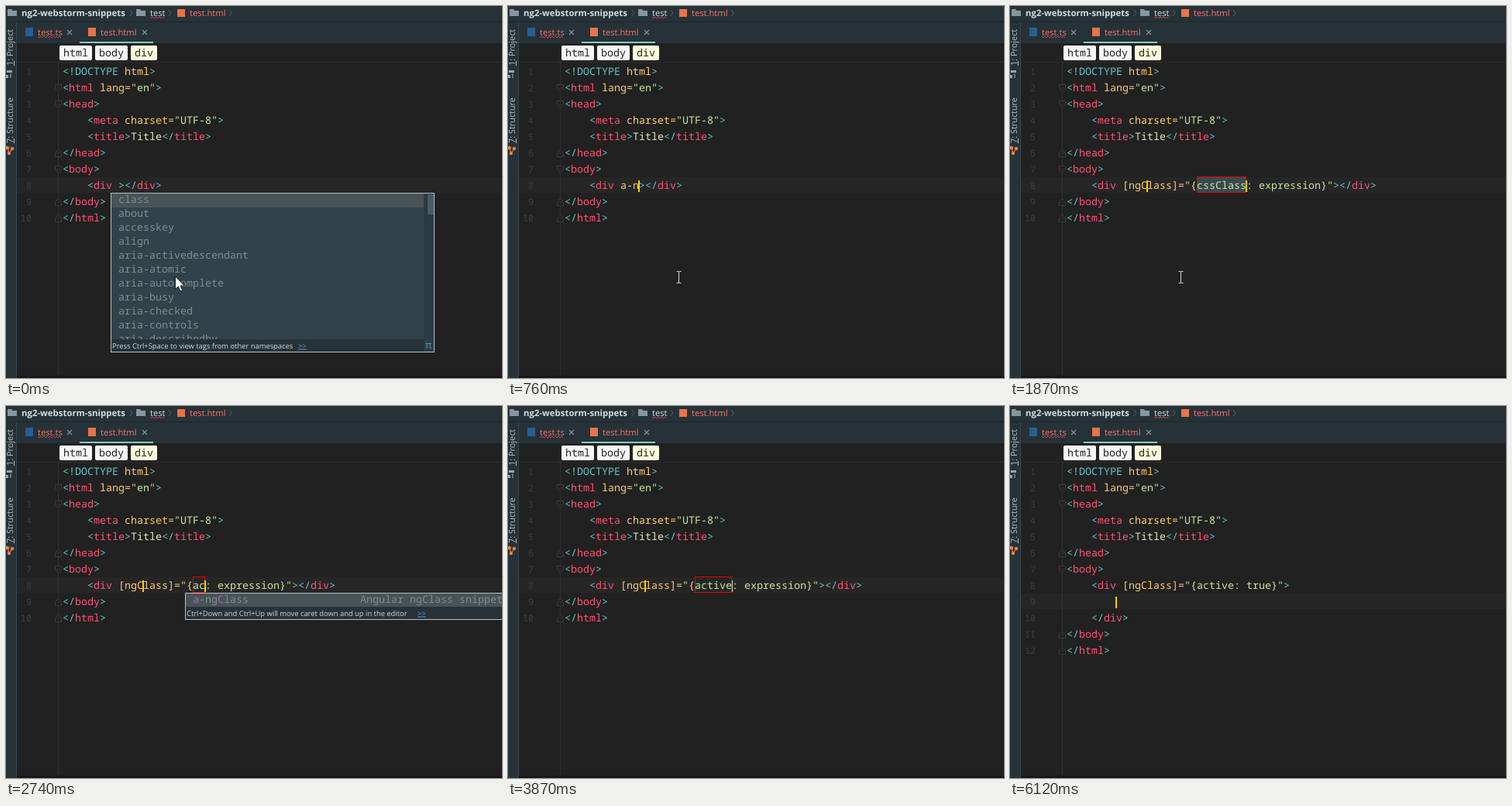
An HTML page for the animation above (7 s loop, 640 by 480 pixels).

```html
<!DOCTYPE html>
<html lang="en">
<head>
<meta charset="utf-8">
<title>Editor snippet</title>
<style>
  html, body { margin: 0; width: 100%; height: 100%; overflow: hidden; background: #212121; }
  svg { display: block; width: 640px; height: 480px; }
  text { white-space: pre; text-rendering: geometricPrecision; }
  .code { font: 500 13.333px "Noto Sans Mono", "DejaVu Sans Mono", monospace; }
  .num { font: 11.7px "Noto Sans Mono", "DejaVu Sans Mono", monospace; fill: #3c3f40; }
  .ui { font-family: "Open Sans", "Noto Sans", sans-serif; font-size: 11.2px; }
  .tip { font-family: "Open Sans", "Noto Sans", sans-serif; font-size: 9.4px; }
</style>
</head>
<body>
<svg id="stage" viewBox="0 0 640 480" xmlns="http://www.w3.org/2000/svg">
  <g id="frame"></g>
  <g id="editor"></g>
</svg>
<script>
const LOOP = 7000, CELL = 8, LEFT = 73, ROW = 21;
const C = {
  bracket: '#66c5c9', tag: '#ff5370', attr: '#ffcb6b', string: '#c9e69a', plain: '#e4e6b4',
  panel: '#263238', caret: '#ffcc00', red: '#f00000', dim: '#7f8c90', hit: '#ab63bd', salmon: '#f77669'
};

const esc = s => s.replace(/&/g, '&amp;').replace(/</g, '&lt;').replace(/>/g, '&gt;');
const rect = (x, y, w, h, fill, more = '') =>
  `<rect x="${x}" y="${y}" width="${w}" height="${h}" fill="${fill}" ${more}/>`;
const text = (x, y, s, fill, cls = 'code', more = '') =>
  `<text x="${x}" y="${y}" class="${cls}" fill="${fill}" xml:space="preserve" ${more}>${esc(s)}</text>`;
const path = (d, stroke, more = '') => `<path d="${d}" fill="none" stroke="${stroke}" ${more}/>`;
const colX = col => LEFT + col * CELL;
const rowY = row => 74 + (row - 1) * ROW;

function wave(x, end, y) {
  let d = `M${x} ${y}`;
  for (let i = 1; x + i * 2 <= end; i++) d += `L${x + i * 2} ${y + (i % 2 ? 2 : 0)}`;
  return path(d, '#d8404a', 'stroke-width="0.9"');
}

// Colours one line of markup
function markup(line, row) {
  let col = 0, mode = 'plain', out = '';
  for (const [part] of line.matchAll(/<!DOCTYPE|<\/?|>|"[^"]*"|\s+|[^<>"\s]+/g)) {
    let fill = C[mode];
    if (part === '<!DOCTYPE') { fill = C.bracket; mode = 'attr'; }
    else if (part[0] === '<') { fill = C.bracket; mode = 'tag'; }
    else if (part === '>') { fill = C.bracket; mode = 'plain'; }
    else if (part[0] === '"') fill = C.string;
    else if (mode === 'tag' && part.trim()) mode = 'attr';
    if (part.trim()) out += text(colX(col), rowY(row) + 15, part, fill);
    col += part.length;
  }
  return out;
}

const folder = x => `<path d="M${x} 4h5l1.5 2h5.5v7h-12z" fill="#8497a0"/>`;
const chevron = x => path(`M${x} 5l3 4l-3 4`, '#52636b');
const cross = x => path(`M${x - 3} 31l6 6m0 -6l-6 6`, '#82929a', 'stroke-width="1.2"');
const sideLabel = (y, s) =>
  text(0, 0, s, '#b4c1c7', 'ui', `style="font-size:10.9px" transform="translate(9 ${y}) rotate(-90)"`);
const crumb = (x, w, s, fill) =>
  rect(x, 51, w, 19, fill, 'rx="2"') + text(x + 5, 65, s, '#222');

function chrome() {
  return rect(0, 0, 640, 480, '#212121') +
    rect(0, 0, 640, 48, C.panel) + rect(0, 20, 640, 1, '#1c262b') +
    rect(0, 21, 13, 459, C.panel) + rect(13, 21, 1, 459, '#3a484f') +
    folder(2) + text(20, 13, 'ng2-webstorm-snippets', '#d3dce0', 'ui', 'style="font-size:11.4px;font-weight:700"') +
    chevron(160) + folder(168) + text(186, 13, 'test', '#d3dce0', 'ui') + wave(186, 205, 14) +
    chevron(210) + rect(221, 4, 10, 10, '#e8734a') + text(237, 13, 'test.html', C.salmon, 'ui') + chevron(288) +
    rect(25, 28, 10, 11, '#285f91') + text(41, 38, 'test.ts', C.salmon, 'ui') + wave(41, 72, 39) + cross(82) +
    rect(106, 28, 10, 11, '#e8734a') + text(122, 38, 'test.html', C.salmon, 'ui') + cross(179) +
    rect(95, 46, 95, 2, '#80cbc4') +
    sideLabel(77, '1: Project') + rect(10, 71, 1, 6, '#b4c1c7') +
    rect(1, 83, 7, 3, '#9aa7ad') + rect(0, 89, 3, 4, '#9aa7ad') + rect(5, 87, 2, 6, '#65747b') +
    sideLabel(177, '7: Structure') + rect(10, 171, 1, 6, '#b4c1c7') +
    path('M2 183L4 190L8 184', '#c9793f', 'stroke-width="1.3"') +
    [[2, 183], [8, 184], [4, 190]].map(([x, y]) => `<circle cx="${x}" cy="${y}" r="2.2" fill="#e8824c"/>`).join('') +
    rect(14, 72, 626, 1, '#2e2e2e') +
    crumb(69, 42, 'html', '#f6f6f6') + crumb(115, 42, 'body', '#f6f6f6') + crumb(161, 34, 'div', '#fafbdc') +
    rect(14, 477, 626, 3, '#191719');
}

function fold(row, closing) {
  const y = rowY(row) + 11;
  const d = closing ? `M63.5 ${y + 4.5}v-5l4 -4l4 4v5z` : `M63.5 ${y - 4.5}v5l4 4l4 -4v-5z`;
  return `<path d="${d}" fill="#212121" stroke="#3b3b3b"/>` + rect(65.5, y - .5, 4, 1, '#3b3b3b');
}

// Colours the letters of a suggestion that match the typed query
function suggestion(x, y, word, query) {
  let k = 0, spans = '';
  for (const ch of word) {
    const hit = k < query.length && ch.toLowerCase() === query[k];
    if (hit) k++;
    spans += `<tspan fill="${hit ? C.hit : C.dim}">${ch}</tspan>`;
  }
  return `<text x="${x}" y="${y}" class="code">${spans}</text>`;
}

function popup({ x = 135, w = 418, items, notes = [], query, tip, link, bottom, right = 531, bar = true, thumb = 0, bulb }) {
  const top = 241, foot = bottom - 16, edge = bar ? x + 404 : x + w;
  let out = rect(x, top, w, bottom - top, '#31424a') + rect(x, top + 1, edge - x, 18, '#495257');
  out += `<clipPath id="list"><rect x="${x}" y="${top}" width="${w}" height="${foot - top}"/></clipPath><g clip-path="url(#list)">`;
  items.forEach((word, i) => {
    const y = 254 + i * 18;
    out += suggestion(x + 10, y, word, query);
    if (notes[i]) out += text(right, y, notes[i], C.dim, 'code', 'text-anchor="end"');
  });
  out += '</g>';
  if (bar) out += rect(edge, top + 1, 14, foot - top - 1, '#2a3a42');
  if (thumb) out += rect(544, 243, 8, thumb, '#4b5a62');
  out += rect(x, foot, w, 16, C.panel) + text(x + 2, bottom - 4.5, tip, '#d2dadd', 'tip') +
    text(link, bottom - 4.5, '>>', '#5b9fd0', 'tip', 'text-decoration="underline"');
  if (bar) out += rect(539, foot, 14, 16, '#2b3c45') + text(541, bottom - 4, 'π', '#4fa3d1', 'ui', 'style="font-size:13px"');
  if (bulb) out += '<circle cx="543" cy="250" r="4.8" fill="#f5b74b"/><circle cx="542" cy="249" r="2" fill="#ffdb8b"/>' +
    rect(541, 255, 4, 4, '#b9bdbf');
  return out + rect(x + .5, top + .5, w - 1, bottom - top, 'none', 'stroke="#b4c0c5"');
}

const arrow = '<path d="M218.5 349v16.5l3.8 -3.6l2.6 6l2.8 -1.2l-2.6 -5.8h5.2z" fill="#fff" stroke="#111" stroke-width="0.9"/>';
const beam = path('M217.5 342.5h2.5l.5 1l.5 -1h2.5M220.5 343v14M217.5 357.5h2.5l.5 -1l.5 1h2.5', '#d8d8d8');

const aria = 'activedescendant atomic autocomplete busy checked controls describedby disabled dropeffect expanded flowto'
  .split(' ').map(s => 'aria-' + s);
const attrList = (items, query) => popup({
  items: items.slice(0, 11), query, bottom: 446, thumb: 26, link: 377,
  tip: 'Press Ctrl+Space to view tags from other namespaces'
});
const directives = ['Class', 'For', 'If', 'Model', 'Style', 'Switch'];
const note = s => `Angular ${/^(For|If)$/.test(s) ? '*' : ''}ng${s} snippet`;
const snippetList = bulb => popup({
  items: directives.map(s => 'a-ng' + s), notes: directives.map(note),
  query: 'a-ng', bottom: 365, link: 525, bulb,
  tip: 'Press Ctrl+Period to choose the selected (or first) suggestion and insert a dot afterwards'
});
const classList = () => popup({
  x: 231, w: 424, items: ['a-ngClass'], notes: [note('Class')], query: 'ac', bottom: 275, right: 641,
  bar: false, link: 531, tip: 'Ctrl+Down and Ctrl+Up will move caret down and up in the editor'
});

const typing = (s, more) => ({ line: `    <div ${s}></div>`, caret: 9 + s.length, ...more });
const filled = (key, value, more) => ({ line: `    <div [ngClass]="{${key}: ${value}}"></div>`, old: true, ...more });
const keyStep = (key, more) => filled(key, 'expression', { caret: 21 + key.length, box: [21, key.length], ...more });
const valueStep = (value, more) =>
  filled('active', value, { caret: 29 + value.length, box: [29, value.length], thin: true, ...more });

const steps = [
  [0, typing('', { caret: null, list: () => attrList(['class', 'about', 'accesskey', 'align', ...aria], ''), mouse: arrow })],
  [250, typing('a', { list: () => attrList(['about', 'accesskey', 'align', ...aria], 'a'), mouse: arrow })],
  [370, typing('a-', { list: () => attrList(aria, 'a-'), mouse: arrow })],
  [760, typing('a-n', { mouse: beam })],
  [870, typing('a-ng', { list: () => snippetList(false), mouse: arrow })],
  [1620, typing('a-ng', { list: () => snippetList(true), mouse: arrow })],
  [1870, keyStep('cssClass', { select: true, mouse: beam })],
  [2740, keyStep('ac', { list: classList })],
  [3000, keyStep('act')],
  [3110, keyStep('acti')],
  [3230, keyStep('activ')],
  [3370, keyStep('active')],
  [3870, keyStep('active', { caret: null, thin: true })],
  [4120, valueStep('expression', { select: true })],
  [4250, valueStep('t')],
  [4370, valueStep('tr')],
  [4620, valueStep('tru')],
  [4740, valueStep('true')],
  [5120, filled('active', 'true', { caret: 35, thin: true, quotes: true })],
  [5620, filled('active', 'true', { caret: 36, thin: true, quotes: true })],
  [5750, filled('active', 'true', { caret: 36 })],
  [6120, { line: '    <div [ngClass]="{active: true}">', split: true, caret: 8 }]
];

const head = ['<!DOCTYPE html>', '<html lang="en">', '<head>', '    <meta charset="UTF-8">',
  '    <title>Title</title>', '</head>', '<body>'];

function draw(s) {
  const lines = [...head, s.line, ...(s.split ? ['', '    </div>'] : []), '</body>', '</html>'];
  const row = s.split ? 9 : 8, y = rowY(row), last = lines.length;
  let out = rect(14, y, 626, 20, '#262626') + rect(67, 73, 1, 404, '#303030');
  [2, 3, 7].forEach(r => out += fold(r, false));
  [6, last - 1, last].forEach(r => out += fold(r, true));
  if (s.select) out += rect(colX(s.box[0]), y, s.box[1] * CELL, 20, '#3a4a50');
  lines.forEach((line, i) => {
    out += text(33, rowY(i + 1) + 15, String(i + 1), '#3c3f40', 'num', 'text-anchor="end"') + markup(line, i + 1);
  });
  if (s.quotes) out += [19, 34].map(c => rect(colX(c), y + 16, CELL, 1, C.caret)).join('');
  if (s.box) out += rect(colX(s.box[0]) + .5, y - .5, s.box[1] * CELL - 1, 20, 'none', `stroke="${C.red}"`);
  if (s.old) out += rect(colX(13) - 1, y + 4, 2, 15, C.caret);
  if (s.thin) out += rect(colX(27), y + 4, 1, 15, '#d5d5c8');
  if (s.caret) out += rect(colX(s.caret) - 1, y + 4, 2, 15, C.caret);
  return out + (s.list ? s.list() : '') + (s.mouse || '');
}

document.getElementById('frame').innerHTML = chrome();
const editor = document.getElementById('editor');
const start = performance.now();
let shown = null;

function update() {
  const t = (performance.now() - start) % LOOP;
  const [, state] = steps.findLast(([at]) => at <= t) || steps[0];
  if (state !== shown) {
    shown = state;
    editor.innerHTML = draw(state);
  }
  requestAnimationFrame(update);
}
update();
</script>
</body>
</html>
```
